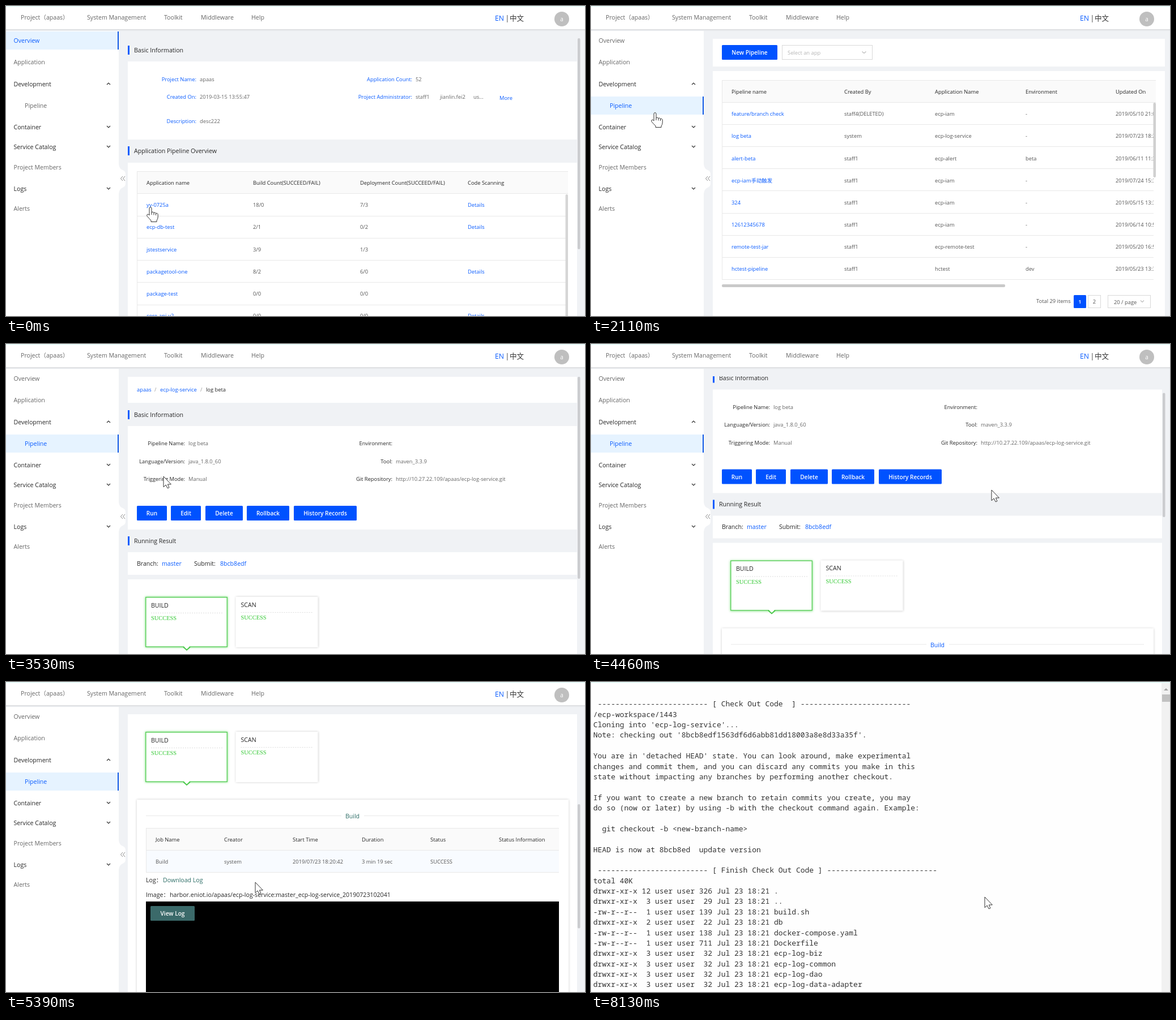
Recreate the animation shown at these times as an HTML page with a canvas. Size 1022 px wide and 548 px high, loop 8.23 s.

```html
<!DOCTYPE html>
<html lang="en">
<head>
<meta charset="utf-8">
<title>Pipeline console</title>
<style>
html, body { margin: 0; width: 100%; height: 100%; overflow: hidden; background: #fff; }
canvas { display: block; }
</style>
</head>
<body>
<canvas id="stage" width="1022" height="548"></canvas>
<script>
const c = document.getElementById('stage').getContext('2d');
const LOOP = 8230, TICK = 78.2;
const BLUE = '#0a5cff', GREY = '#666', DARK = '#262626', LINE = '#e8e8e8', BACK = '#f0f2f5', TEAL = '#2f6f68';
const SMALL = 9.36, BIG = 10.6;
const SANS = '"Open Sans", "Noto Sans", "Noto Sans CJK SC", "Noto Sans CJK", sans-serif';

function rect(x, y, x2, y2, fill, stroke) {
  if (fill) { c.fillStyle = fill; c.fillRect(x, y, x2 - x, y2 - y); }
  if (stroke) {
    c.strokeStyle = stroke; c.lineWidth = 1;
    c.strokeRect(x + .5, y + .5, x2 - x - 1, y2 - y - 1);
  }
}
function round(x, y, x2, y2, r, fill) {
  c.fillStyle = fill; c.beginPath(); c.roundRect(x, y, x2 - x, y2 - y, r); c.fill();
}
// y is the middle of the capitals
function text(s, x, y, color = GREY, size = SMALL, align = 'left', weight = 400, family = SANS) {
  c.font = `${weight} ${size}px ${family}`;
  c.textAlign = align; c.fillStyle = color;
  c.fillText(s, x, y + size * .357);
}
function hline(x, x2, y, color = LINE) { rect(x, Math.round(y), x2, Math.round(y) + 1, color); }
function stroke(path, color, width = 1) {
  c.strokeStyle = color; c.lineWidth = width; c.stroke(new Path2D(path));
}
function chevron(x, y, up, color = '#333', w = 3) {
  const d = up ? -1.5 : 1.5;
  stroke(`M${x - w},${y - d} L${x},${y + d} L${x + w},${y - d}`, color, 1.2);
}
function button(label, x, y, x2, color = '#0052ff') {
  round(x, y, x2, y + 26, 1.5, color);
  text(label, (x + x2) / 2, y + 13.5, '#fff', 10.1, 'center', 600);
}
function heading(s, y) {
  rect(215, y - 8, 218, y + 8, BLUE);
  text(s, 226, y, DARK, BIG);
}
function field(label, value, x, y, color = DARK) {
  text(label + ':', x, y, color, SMALL, 'right');
  text(value, x + 6, y);
}
function panel(y, y2, x2 = 1008) { rect(215, y, x2, y2, '#fff'); }
function scrollbar(y, y2) { round(1009, y, 1013.5, y2, 2, '#cbcccf'); }

function header() {
  rect(0, 0, 1022, 41, '#fff');
  rect(0, 41, 1022, 42, '#d9dadc');
  rect(0, 42, 1022, 44, '#e7e9ec');
  [['Project（apaas）', 26], ['System Management', 143], ['Toolkit', 279], ['Middleware', 344], ['Help', 433]]
    .forEach(([s, x]) => text(s, x, 20, GREY, BIG));
  text('EN', 863, 22, BLUE, 12.3);
  text('|', 881.5, 22, '#333', 12.3);
  text('中文', 889, 22, '#333', 12.6);
  c.fillStyle = '#bfbfbf';
  c.beginPath(); c.arc(981, 23, 13, 0, 7); c.fill();
  text('a', 981, 23, '#fff', 10, 'center');
}

function sidebar(active) {
  rect(0, 44, 199, 548, '#fff');
  c.fillStyle = '#fff';
  c.fill(new Path2D('M199,280 Q200,288 206,290 Q211,292 211,297 V314 Q211,319 206,321 Q200,323 199,332Z'));
  stroke('M206,301 l-3.5,4 l3.5,4 M210,301 l-3.5,4 l3.5,4', '#888');
  const y = active == 'Overview' ? 45 : 160;
  rect(0, y, 199, y + 32, '#e6f3ff');
  rect(197, y, 199, y + 32, '#1259e6');
  [['Overview', 61], ['Application', 99], ['Development', 138, 1], ['Pipeline', 176], ['Container', 214, 1],
   ['Service Catalog', 249, 1], ['Project Members', 285], ['Logs', 323, 1], ['Alerts', 358]].forEach(([s, y, group]) => {
    text(s, s == 'Pipeline' ? 33 : 13.5, y, s == active ? BLUE : group ? DARK : GREY, BIG);
    if (group) chevron(181, y - .5, s == 'Development');
  });
}

function overview() {
  heading('Basic Information', 78);
  panel(98, 236);
  field('Project Name', 'apaas', 336, 130, BLUE);
  field('Created On', '2019-03-15 13:55:47', 336, 161, BLUE);
  field('Description', 'desc222', 336, 204, BLUE);
  field('Application Count', '52', 717, 130, BLUE);
  field('Project Administrator', 'staff1', 717, 161, BLUE);
  text('jianlin.fei2', 766, 161);
  text('us...', 825, 161);
  text('More', 871, 163, BLUE);
  heading('Application Pipeline Overview', 256);
  panel(277, 548);
  const cols = [248, 436, 625, 815];
  rect(231, 292, 992, 332, '#fafafa');
  hline(231, 992, 292);
  hline(231, 992, 331);
  rect(231, 292, 232, 548, LINE);
  ['Application name', 'Build Count(SUCCEED/FAIL)', 'Deployment Count(SUCCEED/FAIL)', 'Code Scanning']
    .forEach((s, i) => text(s, cols[i], 313, DARK));
  [['yy-0725a', '18/0', '7/3', 'Details'], ['ecp-db-test', '2/1', '0/2', 'Details'], ['jstestservice', '3/9', '1/3', ''],
   ['packagetool-one', '8/2', '6/0', 'Details'], ['package-test', '0/0', '0/0', ''], ['core-api-v2', '0/0', '0/0', 'Details']]
    .forEach((row, r) => {
      row.forEach((s, i) => text(s, cols[i], 352 + r * 39.15, i % 3 ? '#555' : BLUE));
      hline(231, 988, 371 + r * 39.15);
    });
  round(987.5, 333, 992, 560, 2, '#d6d6d6');
  scrollbar(57, 430);
}

function pipelines(cur, loaded) {
  panel(58, 107, 1013);
  panel(115, 548, 1013);
  if (!loaded) return;
  button('New Pipeline', 231, 69, 329);
  rect(337, 69, 497, 95, '#fff', '#d9d9d9');
  text('Select an app', 347, 83, '#b5b5b5');
  chevron(482, 82, false, '#bbb', 3.5);
  const cols = [248, 447, 607, 767, 926];
  rect(231, 131, 997, 171, '#fafafa');
  hline(231, 997, 131);
  hline(231, 997, 170);
  rect(231, 131, 232, 484, LINE);
  ['Pipeline name', 'Created By', 'Application Name', 'Environment', 'Updated On']
    .forEach((s, i) => text(s, cols[i], 152, DARK));
  c.save();
  c.beginPath(); c.rect(231, 171, 762, 314); c.clip();
  [['feature/branch check', 'staff4(DELETED)', 'ecp-iam', '-', '2019/05/10 21:04'],
   ['log beta', 'system', 'ecp-log-service', '-', '2019/07/23 18:20'],
   ['alert-beta', 'staff1', 'ecp-alert', 'beta', '2019/06/11 11:32'],
   ['ecp-iam手动触发', 'staff1', 'ecp-iam', '-', '2019/07/24 15:31'],
   ['324', 'staff1', 'ecp-iam', '-', '2019/05/15 13:32'],
   ['12612345678', 'staff1', 'ecp-iam', '-', '2019/06/14 10:52'],
   ['remote-test-jar', 'staff1', 'ecp-remote-test', '-', '2019/05/20 16:53'],
   ['hctest-pipeline', 'staff1', 'hctest', 'dev', '2019/05/23 13:32']].forEach((row, r) => {
    const y = 171 + r * 39.15;
    if (cur.x > 231 && cur.y >= y && cur.y < y + 39) rect(232, y, 993, y + 38, '#f2f8ff');
    row.forEach((s, i) => text(s, cols[i], y + 20, i ? '#555' : BLUE));
    hline(231, 993, y + 38);
  });
  c.restore();
  round(992.5, 171, 997, 303, 2, '#d0d0d0');
  round(231, 492, 731, 497, 2, '#c9c9c9');
  text('Total 29 items', 786, 522, '#555');
  round(852, 511, 874, 534, 1.5, '#0052ff');
  text('1', 863, 523, '#fff', SMALL, 'center', 600);
  rect(877, 511, 900, 534, '#fff', '#d9d9d9');
  text('2', 888.5, 523, '#555', SMALL, 'center');
  rect(912, 511, 988, 534, '#fff', '#d9d9d9');
  text('20 / page', 923, 523.5, '#555');
  chevron(973, 522, false, '#bbb');
}

function card(title, x, y, on) {
  c.save();
  c.shadowColor = on ? '#6fdc6f' : '#ccc';
  c.shadowBlur = 4;
  rect(x, y, x + 145, y + 89, '#fff');
  c.restore();
  if (on) {
    c.strokeStyle = '#5fd05f'; c.lineWidth = 1.5;
    c.strokeRect(x + .75, y + .75, 143.5, 87.5);
    c.fillStyle = '#fff';
    c.fill(new Path2D(`M${x + 67},${y + 86} h12 l-6,8z`));
    stroke(`M${x + 67},${y + 88.5} l6,5.5 l6,-5.5`, '#4cc94c', 2);
  }
  const tx = x + (on ? 10 : 9), ty = y + (on ? 15 : 14);
  text(title, tx, ty, DARK, BIG);
  c.setLineDash([2, 2]);
  stroke(`M${tx},${ty + 13.5} h126`, '#ddd');
  c.setLineDash([]);
  text('SUCCESS', tx, ty + 22.5, '#32c832', 10.4, 'left', 400, '"Liberation Serif", serif');
}

function detail(n, s) {
  c.save();
  c.beginPath(); c.rect(199, 57, 823, 491); c.clip();
  c.translate(0, -s);
  panel(58, 104);
  panel(145, 328);
  panel(368, 408);
  panel(416, 1100);
  if (n >= 41) {
    text('apaas', 231, 81, BLUE);
    text('/', 262, 81, '#999');
    text('ecp-log-service', 272, 81, BLUE);
    text('/', 343, 81, '#999');
    text('log beta', 353, 81, DARK);
    heading('Basic Information', 125);
    field('Pipeline Name', 'log beta', 316, 176);
    field('Language/Version', 'java_1.8.0_60', 316, 207.5);
    field('Triggering Mode', 'Manual', 316, 239);
    field('Environment', '', 682, 176);
    field('Tool', 'maven_3.3.9', 682, 207.5);
    field('Git Repository', 'http://10.27.22.109/apaas/ecp-log-service.git', 682, 239);
    [['Run', 231, 284], ['Edit', 291, 344], ['Delete', 352, 418], ['Rollback', 425, 500], ['History Records', 508, 619]]
      .forEach(([label, x, x2]) => button(label, x, 286, x2));
    heading('Running Result', 348);
    text('Branch:', 231, 388, DARK, BIG);
    text('master', 275, 388, BLUE, BIG);
    text('Submit:', 332, 388, DARK, BIG);
    text('8bcb8edf', 378, 388, BLUE, BIG);
  }
  if (n >= 43) {
    card('BUILD', 246, 447, true);
    card('SCAN', 405.5, 447);
    job(s, n);
  }
  c.restore();
  if (n >= 41) {
    const top = 58 + s * .44;
    scrollbar(top, top + (n < 47 ? 357 : n < 56 ? 339 : 219.5));
  }
}

function job(s, n) {
  c.save();
  c.shadowColor = '#ccc'; c.shadowBlur = 4;
  rect(231, 567, 993, 1100, '#fff');
  c.restore();
  hline(247, 592, 595);
  hline(632, 976, 595);
  text('Build', 611.5, 596.5, s > 100 ? TEAL : BLUE, BIG, 'center');
  const cols = [264, 385, 506, 628, 749, 870];
  rect(247, 617, 976, 657, '#fafafa');
  rect(247, 657, 976, 696, '#f8fbff');
  [617, 656, 695].forEach(y => hline(247, 976, y));
  rect(247, 617, 248, 696, LINE);
  ['Job Name', 'Creator', 'Start Time', 'Duration', 'Status', 'Status Information']
    .forEach((t, i) => text(t, cols[i], 638, DARK));
  ['Build', 'system', '2019/07/23 18:20:42', '3 min 19 sec', 'SUCCESS']
    .forEach((t, i) => text(t, cols[i], 677, '#555'));
  text('Log：', 247, 709, DARK, BIG);
  text('Download Log', 277, 709, n >= 80 ? '#5a96a0' : TEAL, BIG);
  text('Image：', 247, 735, DARK, BIG);
  text('harbor.eniot.io/apaas/ecp-log-service:master_ecp-log-service_20190723102041', 289, 735, DARK, BIG);
  rect(247, 747, 976, 1100, '#000');
  button('View Log', 255, 755, 333, '#3b6a6a');
}

const dash = '-'.repeat(25);
const entry = (mode, links, size, name) =>
  `${mode} ${String(links).padStart(2)} user user ${String(size).padStart(3)} Jul 23 18:21 ${name}`;
const dir = (links, size, name) => entry('drwxr-xr-x', links, size, name);
const file = (size, name) => entry('-rw-r--r--', 1, size, name);
const logLines = [
  ` ${dash} [ Check Out Code  ] ${dash}`,
  '/ecp-workspace/1443',
  "Cloning into 'ecp-log-service'...",
  "Note: checking out '8bcb8edf1563df6d6abb81dd18003a8e8d33a35f'.",
  '',
  "You are in 'detached HEAD' state. You can look around, make experimental",
  'changes and commit them, and you can discard any commits you make in this',
  'state without impacting any branches by performing another checkout.',
  '',
  'If you want to create a new branch to retain commits you create, you may',
  'do so (now or later) by using -b with the checkout command again. Example:',
  '',
  '  git checkout -b <new-branch-name>',
  '',
  'HEAD is now at 8bcb8ed  update version',
  '',
  ` ${dash} [ Finish Check Out Code ] ${dash}`,
  'total 40K',
  dir(12, 326, '.'), dir(3, 29, '..'), file(139, 'build.sh'), dir(2, 22, 'db'),
  file(138, 'docker-compose.yaml'), file(711, 'Dockerfile'),
  ...['biz', 'common', 'dao', 'data-adapter', 'rest'].map(s => dir(3, 32, 'ecp-log-' + s))
];

function logPage() {
  logLines.forEach((s, i) =>
    text(s, 4, 38.6 + i * 18.38, '#333', 12.97, 'left', 400, '"Noto Sans Mono", "Liberation Mono", monospace'));
  rect(1007, 2, 1022, 548, '#f1f1f1');
  rect(1008, 22, 1022, 35, '#c1c1c1');
  c.fillStyle = '#a3a3a3';
  c.fill(new Path2D('M1011,15 h8 l-4,-4z'));
}

// [tick, x, y] of the pointer tip
const path = [
  [0, 255, 355], [11, 60, 172], [12, 51, 163], [14, 51, 163], [21, 57, 176], [26, 57, 176], [27, 113, 188],
  [31, 190, 240], [34, 245, 255], [37, 278, 234], [48, 278, 234], [50, 420, 224], [53, 707, 258], [65, 707, 258],
  [66, 670, 264], [69, 440, 354], [71, 365, 366], [73, 318, 350], [83, 318, 350], [84, 320, 350], [92, 320, 350],
  [94, 390, 341], [98, 694, 378], [103, 694, 378], [104, 695, 380]
];
const scroll = [[55, 0], [56, 20], [57, 64.5], [59, 240], [60, 320], [61, 359]];

function along(keys, n, k) {
  const i = keys.findIndex(key => key[0] > n);
  if (i < 0) return keys[keys.length - 1][k];
  if (i == 0) return keys[0][k];
  const a = keys[i - 1], b = keys[i];
  return a[k] + (b[k] - a[k]) * (n - a[0]) / (b[0] - a[0]);
}

const arrow = new Path2D('M0,0 V18.8 L4.2,15 L7.2,21 L10,19.8 L7.4,14 H13.4Z');
const hand = new Path2D('M-2,15 V3 Q-2,.5 0,.5 Q2,.5 2,3 V10 Q4,7.5 6,10.5 Q8,8.5 9.5,11.5 Q13,10.5 13.2,14 V18 ' +
  'Q13,22 11,24 V26.5 H1 V24 Q-2,21 -6,16.5 Q-7,13.5 -4.8,13 Q-3,13.2 -2,15Z');
const knuckles = new Path2D('M2,10 V14 M6,10.5 V14.5 M9.5,11.5 V15');
const handSpans = [[0, 1], [12, 30], [36, 40], [76, 83]];

function pointer(n, { x, y }) {
  const isHand = handSpans.some(([a, b]) => n >= a && n <= b);
  const shape = isHand ? hand : arrow;
  c.save();
  c.translate(x, y);
  c.fillStyle = '#fff'; c.fill(shape);
  c.strokeStyle = '#333'; c.lineWidth = 1; c.lineJoin = 'round'; c.stroke(shape);
  if (isHand) c.stroke(knuckles);
  c.restore();
}

function draw(now) {
  const n = Math.floor((now % LOOP + 10) / TICK);
  const cur = { x: along(path, n, 1), y: along(path, n, 2) };
  rect(0, 0, 1022, 548, n < 84 ? BACK : '#fefefe');
  if (n < 84) {
    if (n < 15) overview();
    else if (n < 39) pipelines(cur, n >= 17);
    else detail(n, along(scroll, n, 1));
    sidebar(n < 14 ? 'Overview' : 'Pipeline');
    header();
  } else if (n >= 86) logPage();
  rect(0, 0, 1022, 1.5, '#e4fdfa');
  pointer(n, cur);
  requestAnimationFrame(draw);
}
requestAnimationFrame(draw);
</script>
</body>
</html>
```
